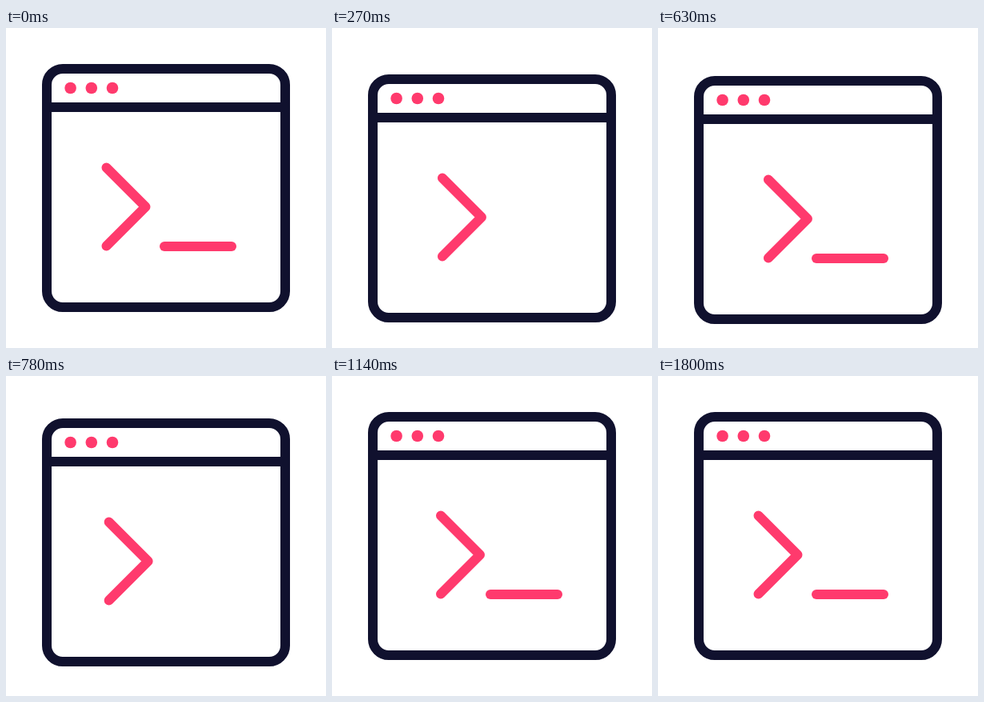
An HTML page with a canvas for the animation above (1.83 s loop, 400 by 400 pixels).

```html
<!DOCTYPE html>
<html lang="en">
<head>
<meta charset="utf-8">
<title>Terminal window</title>
<style>
  html, body { margin: 0; width: 100%; height: 100%; overflow: hidden; background: #fff; }
  canvas { display: block; width: 400px; height: 400px; }
</style>
</head>
<body>
<canvas id="stage" width="400" height="400"></canvas>
<script>
const ctx = document.getElementById('stage').getContext('2d');
const NAVY = '#10112e', PINK = '#ff3a6d';
const LOOP = 1830, STEP = 30;

// Smooth 0..1 swell: quarter sine squared
const swell = u => Math.sin(u * Math.PI / 2) ** 2;

// Window sinks, then drifts back with a soft landing
function windowY(t) {
  const peak = 440, end = 1230;
  if (t < peak) return 18.9 * swell(t / peak);
  if (t < end) return 18.9 * swell(((end - t) / (end - peak)) ** 1.4);
  return 0;
}

// Prompt sways right and back twice per loop
const promptX = t => 19 * swell(t / 450);

// Cursor blinks every 600 ms
function cursorOn(t) {
  const phase = t % 600;
  return phase < 120 || phase >= 300;
}

function line(...points) {
  ctx.beginPath();
  for (const [x, y] of points) ctx.lineTo(x, y);
  ctx.stroke();
}

function draw(t) {
  ctx.fillStyle = '#fff';
  ctx.fillRect(0, 0, 400, 400);
  ctx.save();
  ctx.translate(0, Math.round(windowY(t)));
  ctx.lineWidth = 12;
  ctx.lineJoin = ctx.lineCap = 'round';

  ctx.strokeStyle = NAVY;
  ctx.beginPath();
  ctx.roundRect(51, 51, 298, 298, 20);
  ctx.stroke();
  line([51, 99], [349, 99]);

  ctx.fillStyle = ctx.strokeStyle = PINK;
  for (const x of [80.6, 106.8, 133]) {
    ctx.beginPath();
    ctx.arc(x, 75, 7.3, 0, Math.PI * 2);
    ctx.fill();
  }

  if (cursorOn(t)) line([198, 273], [282, 273]);
  ctx.translate(promptX(t), 0);
  line([125.5, 174.5], [174.5, 223.5], [125.5, 272.5]);
  ctx.restore();
}

const start = performance.now();
function tick() {
  const t = (performance.now() - start) % LOOP;
  draw(Math.floor(t / STEP) * STEP);
  requestAnimationFrame(tick);
}
tick();
</script>
</body>
</html>
```
